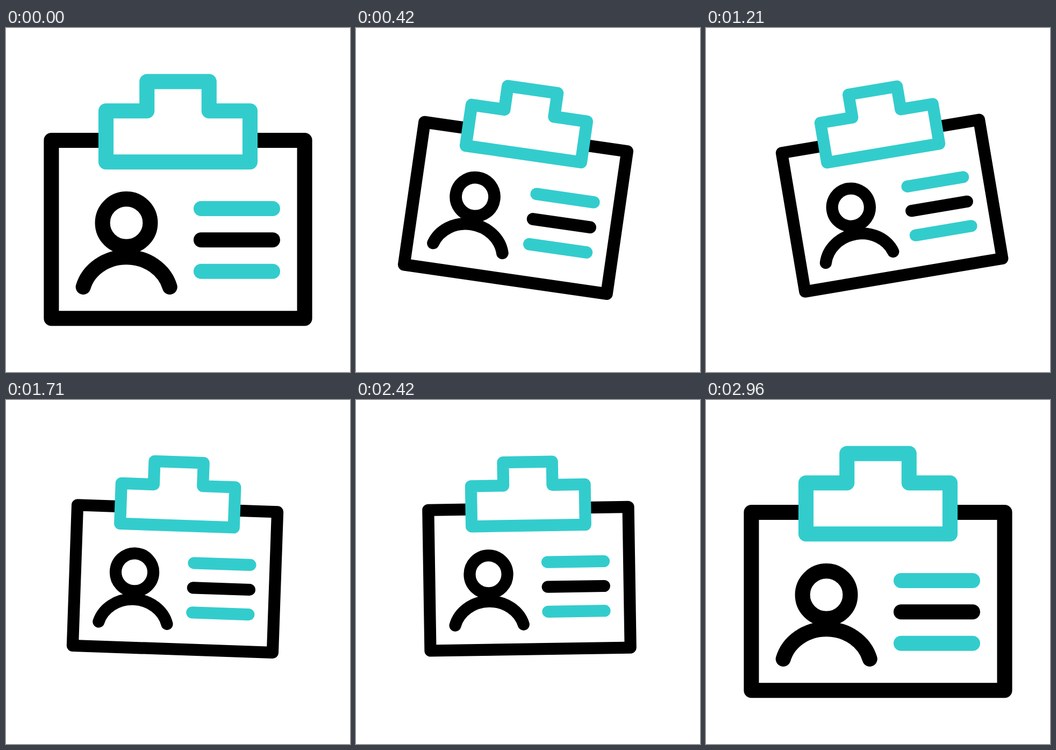
An HTML page that plays this animation: 640 px wide and 640 px high, repeating every 3000 ms.

```html
<!DOCTYPE html>
<html lang="en">
<head>
<meta charset="utf-8">
<title>Swinging badge</title>
<style>
  html, body { margin: 0; width: 100%; height: 100%; overflow: hidden; background: #fff; }
  svg { display: block; width: 100%; height: 100%; }
  #badge { fill: none; stroke: #000; stroke-width: 28.1; stroke-linecap: round; stroke-linejoin: round; }
  #badge .teal { stroke: #3cc; }
</style>
</head>
<body>
<svg viewBox="0 0 640 640">
  <g id="badge">
    <path d="M84.4 209H555.6V540.3H84.4Z"/>
    <path class="teal" fill="#fff" d="M186 249.2V154.3H262.2V99.6H377.8V154.3H454V249.2Z"/>
    <circle cx="224" cy="362.5" r="44.4"/>
    <path d="M143.7 481.8C153.2 449.8 185.6 426.3 224.2 426.3S295.2 449.8 304.7 481.8"/>
    <path class="teal" d="M363 336H496M363 452.7H496"/>
    <path d="M363 394.3H496"/>
  </g>
</svg>
<script>
  const LOOP = 3000, FPS = 24, LAST = 71;
  const PIVOT = [320, 175];

  // [tick, value] pairs, one tick being 1/24 s
  const ANGLE = [[0, 0], [13, 9], [26.8, -10], [40.8, 2], [54, -1], [71, 0]];
  const SCALE = [[0, 1], [13, 0.79], [58, 0.79], [71, 1]];

  const badge = document.getElementById('badge');

  // cubic-bezier(.5, 0, .5, 1)
  function ease(x) {
    let lo = 0, hi = 1;
    for (let i = 0; i < 24; i++) {
      const t = (lo + hi) / 2;
      if (1.5 * t * (1 - t) + t ** 3 < x) lo = t; else hi = t;
    }
    return lo * lo * (3 - 2 * lo);
  }

  function valueAt(keys, tick) {
    const next = keys.findIndex(([at]) => at >= tick);
    if (next <= 0) return keys[0][1];
    const [t0, v0] = keys[next - 1], [t1, v1] = keys[next];
    return v0 + (v1 - v0) * ease((tick - t0) / (t1 - t0));
  }

  function draw(now) {
    // steps begin on the nearest hundredth of a second
    const tick = Math.min(LAST, Math.floor((now % LOOP + 4.9) * FPS / 1000));
    const [x, y] = PIVOT;
    badge.setAttribute('transform',
      `translate(${x} ${y}) rotate(${valueAt(ANGLE, tick)}) scale(${valueAt(SCALE, tick)}) translate(${-x} ${-y})`);
    requestAnimationFrame(draw);
  }

  draw(performance.now());
</script>
</body>
</html>
```
